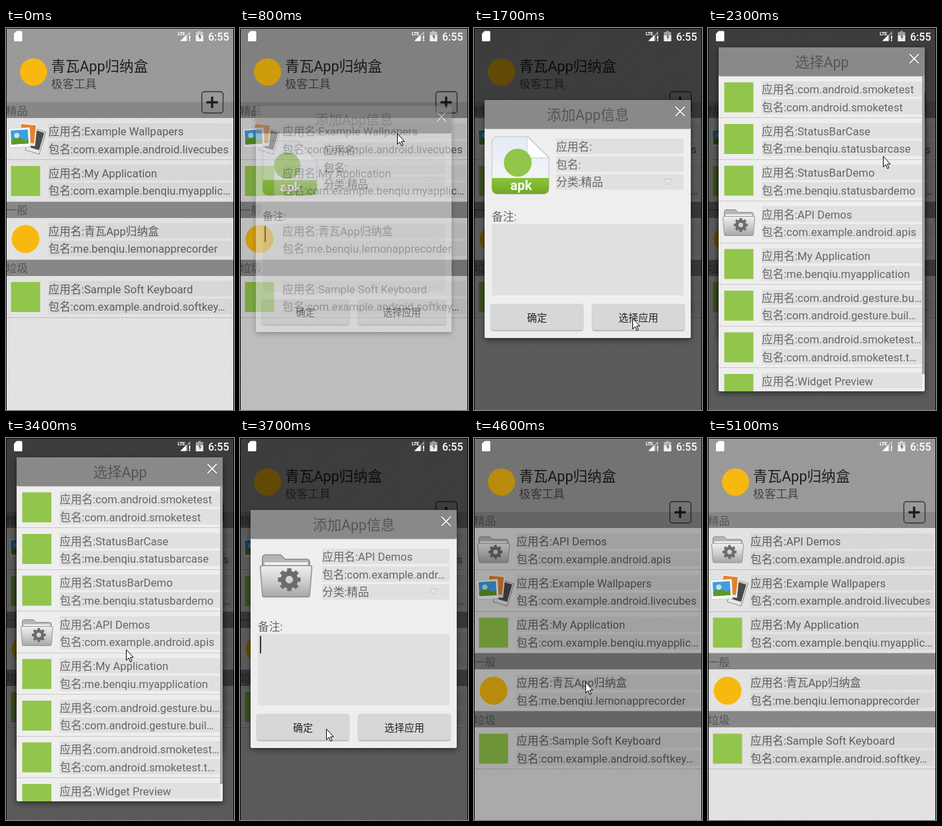
An HTML page that plays this animation: 344x573 px, repeating every 6.2 s.

```html
<!DOCTYPE html>
<html lang="zh">
<head>
<meta charset="utf-8">
<title>App list demo</title>
<style>
html, body { margin: 0; width: 100%; height: 100%; overflow: hidden; background: #000; }
svg { display: block; width: 344px; height: 573px; }
text { font-family: Roboto, "Noto Sans CJK SC", "Noto Sans CJK", sans-serif; white-space: pre; }
.panel { filter: drop-shadow(0 3px 4px rgba(0, 0, 0, .5)); }
.key { filter: drop-shadow(0 1px 1px rgba(0, 0, 0, .4)); }
</style>
</head>
<body>
<svg id="stage" viewBox="0 0 344 573" xmlns="http://www.w3.org/2000/svg"></svg>
<script>
const LOOP = 6200, STEP = 100;
const APP = '青瓦App归纳盒';

const rect = (x, y, w, h, fill, extra = '') =>
  `<rect x="${x}" y="${y}" width="${w}" height="${h}" fill="${fill}" ${extra}/>`;
const text = (x, y, size, fill, str, extra = '') =>
  `<text x="${x}" y="${y}" font-size="${size}" fill="${fill}" ${extra}>${str}</text>`;
const group = (attrs, body) => `<g ${attrs}>${body}</g>`;
const centered = 'text-anchor="middle"';

const defs = `<defs>
  <pattern id="weave" width="4" height="4" patternUnits="userSpaceOnUse" patternTransform="rotate(-45)">
    <rect width="4" height="2" fill="#000" opacity=".03"/>
  </pattern>
  <linearGradient id="metal" x2="0" y2="1">
    <stop stop-color="#f0f0f0"/><stop offset=".5" stop-color="#cfcfcf"/><stop offset="1" stop-color="#a6a6a6"/>
  </linearGradient>
  <linearGradient id="paper" x2="0" y2="1">
    <stop stop-color="#e6eaf2"/><stop offset="1" stop-color="#f6f8fb"/>
  </linearGradient>
  <linearGradient id="grass" x2="0" y2="1">
    <stop stop-color="#8cc43c"/><stop offset="1" stop-color="#6fa825"/>
  </linearGradient>
  <clipPath id="view"><rect x="16" y="72" width="311" height="473"/></clipPath>
</defs>`;

// Icons are drawn around their own centre.
function gear() {
  let teeth = '';
  for (let a = 0; a < 360; a += 45) teeth += rect(-2, -10.5, 4, 6, '#6c6c6c', `transform="rotate(${a})"`);
  return group('transform="translate(3 4)"',
    teeth + '<circle r="5.800" fill="none" stroke="#6c6c6c" stroke-width="4.600"/>');
}

const icons = {
  square: () => rect(-22, -22.5, 44, 45, '#92c54b'),
  circle: () => '<circle r="21" fill="#f7b90f"/>',
  folder: () => `
    <path d="M-22 14V-16q0-3 3-3h14l4 4h20q3 0 3 3V14z" fill="#b5b5b5" stroke="#8c8c8c"/>
    <path d="M-20 -12H20V4H-20z" fill="#f4f4f4"/>
    <path d="M-24 -7q0-2 2-2H22q2 0 2 2L22 18q0 2-2 2H-20q-2 0-2-2z" fill="url(#metal)" stroke="#949494"/>` + gear(),
  photos: () =>
    group('transform="translate(15 3) rotate(17)"',
      rect(-11, -18, 22, 35, '#e6e6e6', 'stroke="#8a8a8a"') + rect(-9, -16, 18, 27, '#4a4a4a')) +
    group('transform="translate(3 -7) rotate(6)"',
      rect(-13, -17, 26, 33, '#f0ece8') + rect(-11, -15, 22, 27, '#e8812a')) +
    group('transform="translate(-9 -3) rotate(-3)"',
      rect(-16, -14, 32, 29, '#fafafa', 'stroke="#c4c4c4" stroke-width=".7"') +
      rect(-13, -11, 26, 21, '#3f9ede') +
      '<path d="M-13 4Q-3-4 3 2T13 2V10H-13z" fill="#5d9b28"/><circle cx="-4" cy="-3" r="4" fill="#bfe3f5"/>')
};
const icon = (name, x, y, scale = 1) =>
  group(`transform="translate(${x} ${y}) scale(${scale})"`, icons[name]());

function row(x, y, right, [kind, name, pkg], bar, ink) {
  return icon(kind, x - 34.5, y + 32) +
    rect(x, y + 8, right - x, 23, bar) + rect(x, y + 34.5, right - x, 23, bar) +
    text(x, y + 26, 16.65, ink, '应用名:' + name) +
    text(x, y + 52.7, 16.65, ink, '包名:' + pkg);
}

const ROW = 62.5, HEAD = 24.5;
const demos = ['folder', 'API Demos', 'com.example.android.apis'];
const best = [
  ['photos', 'Example Wallpapers', 'com.example.android.livecubes'],
  ['square', 'My Application', 'com.example.benqiu.myapplic…']
];
const normal = [['circle', APP, 'me.benqiu.lemonapprecorder']];
const junk = [['square', 'Sample Soft Keyboard', 'com.example.android.softkey…']];

function records(id, top) {
  let y = 110.5, out = '', rules = '';
  for (const [title, items] of [['精品', top], ['一般', normal], ['垃圾', junk]]) {
    const head = Math.round(y);
    out += rect(0, head, 344, Math.round(y + HEAD) - head, '#878787') + text(0, y + 19, 16.4, '#555', title);
    y += HEAD;
    for (const item of items) {
      out += row(64, y, 341, item, '#d7d7d7', '#5c5c5c');
      y += ROW;
      rules += rect(0, Math.floor(y), 344, 1, '#bdbdbd');
    }
  }
  return group(`id="${id}"`, out + rules);
}

const page = rect(0, 0, 344, 573, '#e6e6e6') + rect(0, 0, 344, 111, '#9c9c9c') +
  rect(0, 0, 344, 573, 'url(#weave)') +
  '<circle cx="41.500" cy="66" r="20.500" fill="#f7b90f"/>' +
  text(68, 65, 21.6, '#1d1d1d', APP) +
  text(68, 90, 17.2, '#444', '极客工具') +
  records('before', best) + records('after', [demos, ...best]) +
  rect(295.5, 95.5, 32, 32, 'none', 'rx="4" stroke="#333" stroke-width="1.4"') +
  '<path d="M302.500 111.500h17M311 103v17" stroke="#1c1c1c" stroke-width="3.400"/>';

const status = `
  <path d="M16 4.500h7q1.500 0 1.500 1.500V18.500q0 1.500-1.500 1.500H13.500q-1.500 0-1.500-1.500V8.500z" fill="#fff"/>
  <path d="M263 19.500L278 4.500V10H274V19.500z" fill="#fff" opacity=".45"/>
  <path d="M263 19.500L272 10.500V19.500z" fill="#fff"/>
  <path d="M276 11.500h2v5h-2zM276 17.500h2v2h-2z" fill="#fff"/>
  <path d="M290 4.500h4v1.500h3.500V20h-11V6H290z" fill="#fff" opacity=".5"/>
  <path d="M286.500 11h11V20h-11z" fill="#fff" opacity=".8"/>
  <path d="M293 8.500l-3 5h2v4l3-5h-2z" fill="#666"/>` +
  text(259, 10.5, 8, '#fff', 'LTE', 'font-weight="700" letter-spacing="-.8"') +
  text(305, 18.5, 16, '#fff', '6:55', 'font-weight="500"');

// A grey title bar over a light sheet, with a cross at the top right.
function sheet(y, h, title) {
  const cross = `M304 ${y + 10}l14 14m0-14l-14 14`;
  return rect(16, y, 311, h, '#eee', 'rx="2"') + rect(16, y, 311, 43.5, '#898989', 'rx="2"') +
    text(172, y + 30, 21.5, '#555', title, centered) +
    `<path d="${cross}" stroke="#666" stroke-width="3.4"/><path d="${cross}" stroke="#f4f4f4" stroke-width="1.9"/>`;
}

const button = (x, label) =>
  rect(x, 414, 138, 39, '#d6d8d7', 'rx="2" class="key"') +
  text(x + 69, 439.5, 15, '#222', label, centered + ' font-weight="500"');

const apk = group('id="blank"',
  `<path d="M36 163H82L113 194V240q0 9-9 9H36q-9 0-9-9V172q0-9 9-9z" fill="url(#paper)" stroke="#b9c4cc"/>
   <path d="M80 163L113 195H85q-5 0-5-5z" fill="#fff" stroke="#c3cbd2"/>
   <circle cx="66" cy="202" r="21" fill="#92c54b"/>
   <path d="M27 225H113V240q0 9-9 9H36q-9 0-9-9z" fill="url(#grass)"/>` +
  text(71, 243, 20, '#fff', 'apk', centered + ' font-weight="700"'));

const line = '#e0e0e0', ink = '#666';
const field = (y, label, id, value) =>
  rect(124, y, 192, 23, line) +
  text(124, y + 18, 16.65, ink, `${label}<tspan id="${id}">${value}</tspan>`);

const form = sheet(108, 357, '添加App信息') + apk +
  group('id="chosen"', icon('folder', 69.5, 206, 1.62)) +
  field(166, '应用名:', 'name', '') + field(192.7, '包名:', 'pkg', '') + field(219.4, '分类:', 'kind', '精品') +
  '<path d="M286 226.500h12l-6 8.500z" fill="#e8e8e8" stroke="#c3c3c3"/>' +
  text(27, 288.5, 16.65, ink, '备注:') +
  rect(27, 294, 289, 107, line) + rect(30, 297, 2, 26, '#333', 'id="caret"') +
  button(26, '确定') + button(179, '选择应用') +
  rect(16, 108, 311, 357, '#000', 'id="shade"');

const choices = [
  ['square', 'com.android.smoketest', 'com.android.smoketest'],
  ['square', 'StatusBarCase', 'me.benqiu.statusbarcase'],
  ['square', 'StatusBarDemo', 'me.benqiu.statusbardemo'],
  demos,
  ['square', 'My Application', 'me.benqiu.myapplication'],
  ['square', 'com.android.gesture.bu…', 'com.android.gesture.buil…'],
  ['square', 'com.android.smoketest…', 'com.android.smoketest.t…'],
  ['square', 'Widget Preview', 'com.android.widgetpre…']
];
const picker = sheet(29, 516, '选择App') +
  group('clip-path="url(#view)"', choices.map((item, i) => {
    const y = 72 + i * ROW;
    return row(81, y, 323, item, line, ink) + rect(16, Math.floor(y + ROW), 311, 1, '#c8c8c8');
  }).join('')) +
  rect(323, 72, 4, 447, '#a2a2a2');

const arrow = '<path d="M.5 .5V16.500L4.200 13L6.700 18.800L9 17.800L6.500 12.100H11.200z" fill="#fff" stroke="#000" stroke-width="1"/>';

document.getElementById('stage').innerHTML = defs + page +
  rect(0, 0, 344, 573, '#000', 'id="dim"') +
  group('id="form" class="panel"', form) + group('id="picker" class="panel"', picker) +
  status +
  '<path d="M.5 573V.5H343.500V573" fill="none" stroke="#000"/>' +
  group('id="cursor"', arrow);

const el = id => document.getElementById(id);
const show = (id, on) => el(id).setAttribute('display', on ? 'inline' : 'none');

// Linear value along points of the form [time, ...values].
function track(points, t) {
  const i = points.findIndex(p => p[0] > t);
  if (i < 0) return points[points.length - 1].slice(1);
  if (i === 0) return points[0].slice(1);
  const a = points[i - 1], b = points[i], k = (t - a[0]) / (b[0] - a[0]);
  return a.slice(1).map((v, j) => v + (b[j + 1] - v) * k);
}

const path = [
  [100, 327, 87], [200, 310, 111], [300, 310, 111], [1000, 208, 177],
  [1700, 239, 435], [1800, 240, 437], [1900, 240, 437], [2300, 264, 192],
  [2400, 265, 190], [2500, 265, 190], [3100, 176, 324], [3200, 181, 317],
  [3400, 181, 317], [3700, 130, 436], [3800, 126, 440], [3900, 126, 440],
  [4000, 127, 439], [4200, 127, 439], [4600, 168, 366], [4700, 188, 255],
  [4800, 188, 255], [5000, 318, 105]
];
const dimming = [[700, 0], [1000, .49], [1100, .6], [4400, .6], [4600, .25], [4700, 0]];
const formFade = [[700, 0], [900, 1], [4300, 1], [4500, 0]];
const pickerFade = [[2000, 0], [2200, 1], [3400, 1], [3600, 0]];

function panel(id, fade, t) {
  const [alpha] = track(fade, t);
  const scale = t < fade[1][0] ? .9 + .1 * alpha : 1;
  show(id, alpha > 0);
  el(id).setAttribute('opacity', alpha);
  el(id).setAttribute('transform', `translate(172 287) scale(${scale}) translate(-172 -287)`);
  return alpha;
}

function draw(t) {
  const added = t >= 4400, picked = t >= 3400;
  show('before', !added);
  show('after', added);
  el('dim').setAttribute('opacity', track(dimming, t)[0]);

  panel('form', formFade, t);
  el('shade').setAttribute('opacity', .6 * panel('picker', pickerFade, t));
  show('blank', !picked);
  show('chosen', picked);
  el('name').textContent = picked ? 'API Demos' : '';
  el('pkg').textContent = picked ? 'com.example.andr…' : '';
  show('caret', t < 1300 || (t >= 1800 && t < 4000));

  const [x, y] = track(path, t).map(Math.round);
  show('cursor', t >= 100 && t < 5100);
  el('cursor').setAttribute('transform', `translate(${x} ${y})`);
}

const start = performance.now();
function tick() {
  const t = (performance.now() - start) % LOOP;
  draw(Math.floor(t / STEP) * STEP);
  requestAnimationFrame(tick);
}
tick();
</script>
</body>
</html>
```
